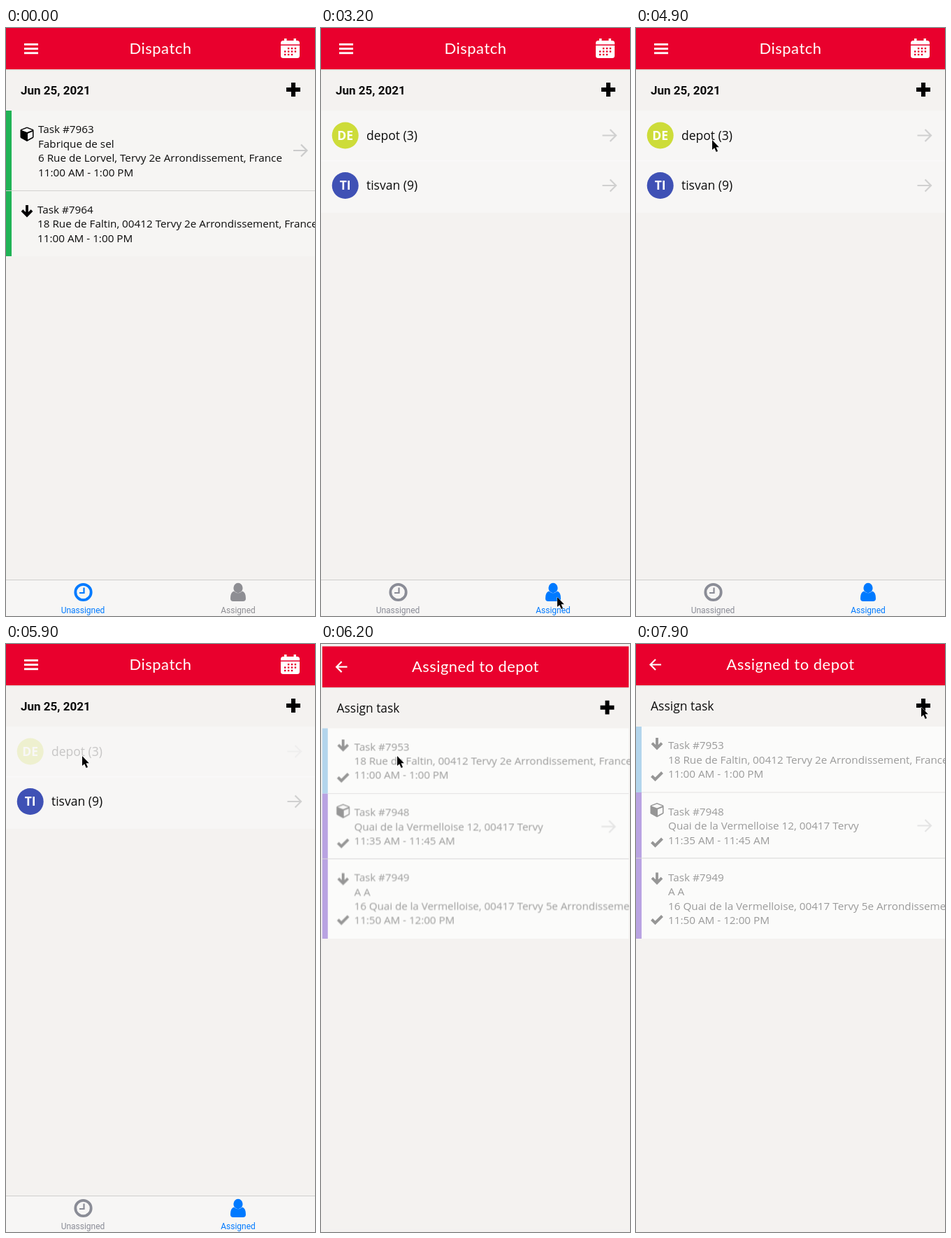
These frames come from a looping animation (442 px wide and 840 px high, 8 s). An HTML page:

```html
<!DOCTYPE html>
<html lang="en">
<head>
<meta charset="utf-8">
<title>Dispatch</title>
<style>
html, body { margin: 0; width: 100%; height: 100%; overflow: hidden; background: #f4f2f0; }
svg { display: block; width: 100vw; height: 100vh; }
text { font: 15.25px "Open Sans", "Noto Sans", sans-serif; fill: #0c0c0c; }
.title { font: 22px Lato, sans-serif; letter-spacing: .5px; fill: #fff; text-anchor: middle; }
.date { font: bold 17px Roboto, sans-serif; }
.big { font-size: 17.5px; }
.initials { font-size: 17.5px; font-weight: bold; fill: #fff; text-anchor: middle; }
.tab text { font: 12px Roboto, sans-serif; fill: currentColor; text-anchor: middle; }
.line { fill: none; stroke: currentColor; }
</style>
</head>
<body>
<svg id="stage" viewBox="0 0 442 840">
  <defs>
    <g id="cube">
      <path d="M0 -9.5 9 -6V5L0 10 -9 5V-6Z" stroke="#000" stroke-linejoin="round"/>
      <path d="M0 -8.4 7.8 -5.4 0 -2.5 -7.8 -5.4ZM1 -.8 8 -3.5V4.3L1 8.1Z" fill="#f8f7f6"/>
    </g>
    <path id="down" class="line" stroke-width="3.8" d="M0 -8.5V6M-7 -.8 0 6.2 7 -.8"/>
    <path id="check" class="line" stroke-width="4" d="M-7.5 0 -2.5 5 7.5 -5"/>
    <path id="next" class="line" stroke-width="2.2" d="M-10 0H9M1 -8.5 9.5 0 1 8.5"/>
    <path id="plus" class="line" stroke-width="6" stroke-linejoin="round" d="M401 88H421M411 78V98"/>
  </defs>
  <g id="home"></g>
  <g id="detail"></g>
  <path id="cursor" d="M0 0V14L3.2 11.2 5.7 17 8 16 5.5 10.3H9.8Z" stroke="#fff" stroke-width=".8" paint-order="stroke"/>
</svg>
<script>
const $ = id => document.getElementById(id);
const rect = (x, y, w, h, fill) => `<rect x="${x}" y="${y}" width="${w}" height="${h}" fill="${fill}"/>`;
const text = (x, y, s, cls = '') => `<text x="${x}" y="${y}" class="${cls}">${s}</text>`;
const icon = (name, x, y, color = '#000') => `<use href="#${name}" x="${x}" y="${y}" color="${color}"/>`;
const lines = (x, y, list) => list.map((s, i) => text(x, y + i * 20.5, s)).join('');

const header = title =>
  rect(0, 0, 442, 840, '#f4f2f0') + rect(0, 59, 442, 1.5, '#e2dcdc') +
  rect(0, 0, 442, 59, '#e9002d') + text(221, 37, title, 'title') + '<use href="#plus"/>';

function calendar() {
  let dots = '';
  for (let row = 0; row < 3; row++)
    for (let col = 0; col < 4; col++)
      if (row + col && row * col < 6) dots += rect(398 + col * 4.9, 28 + row * 4.4, 2.4, 2.4, '#e9002d');
  return '<rect x="393" y="18" width="27" height="25" rx="3.5" fill="#fff"/>' +
    rect(398, 15, 3.5, 5, '#fff') + rect(411.5, 15, 3.5, 5, '#fff') + rect(393, 23.5, 27, 1.5, '#e9002d') + dots;
}

const clock = `<circle cx="110.5" cy="806" r="11.2" class="line" stroke-width="3.8"/>
  <path d="M111.5 799.5V807H105" class="line" stroke-width="2.2"/>`;
const person = `<ellipse cx="332" cy="800" rx="6.6" ry="7.2" fill="currentColor"/>
  <path d="M326 804.5Q321 806 321 815 321 819 325 819H339Q343 819 343 815 343 806 338 804.5 332 810 326 804.5Z" fill="currentColor"/>`;

const userRow = (id, y, color, initials, label) => `<g id="${id}">
  <circle cx="34.7" cy="${y}" r="19" fill="${color}"/>` + text(34.7, y + 6.3, initials, 'initials') +
  text(65, y + 6, label, 'big') + icon('next', 412.5, y, '#d0d0d0') + '</g>';

const unassigned = rect(0, 118, 442, 208, '#f6f5f3') + rect(0, 118, 8, 208, '#21b356') +
  rect(0, 232, 442, 1, '#d3d1cf') + icon('cube', 30, 151.5) +
  lines(46, 150, ['Task #7963', 'Fabrique de sel', '6 Rue de Lorvel, Tervy 2e Arrondissement, France', '11:00 AM - 1:00 PM']) +
  icon('next', 421, 175, '#cbcbcb') + icon('down', 30, 261.5) +
  lines(45, 264.5, ['Task #7964', '18 Rue de Faltin, 00412 Tervy 2e Arrondissement, France', '11:00 AM - 1:00 PM']);

const assigned = rect(0, 118, 442, 146, '#f7f6f5') + rect(0, 189, 442, 1.5, '#faf9f9') +
  userRow('pressed', 153.5, '#cddc39', 'DE', 'depot (3)') +
  userRow('other', 225, '#3f51b5', 'TI', 'tisvan (9)');

$('home').innerHTML = header('Dispatch') +
  [22, 28.2, 34.4].map(y => rect(26, y, 20, 2.8, '#fff')).join('') + calendar() +
  text(21, 95, 'Jun 25, 2021', 'date') +
  `<g id="unassigned">${unassigned}</g><g id="assigned">${assigned}</g>` +
  rect(0, 788, 442, 52, '#f7f6f5') + rect(0, 788, 442, 1, '#cfcecd') +
  `<g id="tabLeft" class="tab">${clock}${text(110, 836.3, 'Unassigned')}</g>
   <g id="tabRight" class="tab">${person}${text(332, 836.3, 'Assigned')}</g>`;

const faded = content => `<g opacity=".4">${content}</g>`;
$('detail').innerHTML = header('Assigned to depot') +
  '<path d="M36 29.5H20.5M28 22 20.5 29.5 28 37" class="line" color="#fff" stroke-width="2.2"/>' +
  text(21, 95, 'Assign task', 'big') +
  rect(0, 118, 442, 303, '#fbfbfa') + rect(0, 118, 8, 94, '#b3d5ec') + rect(0, 212, 8, 209, '#b9a3e2') +
  rect(8, 211.5, 434, 1, '#e3e2e2') + rect(0, 305.5, 442, 1, '#d8d7d7') +
  faded(
    icon('down', 30, 142.5) + icon('check', 30, 188.5) +
    lines(46, 150, ['Task #7953', '18 Rue de Faltin, 00412 Tervy 2e Arrondissement, France', '11:00 AM - 1:00 PM']) +
    icon('cube', 30, 237) + icon('check', 30, 283) +
    lines(46, 244.5, ['Task #7948', 'Quai de la Vermelloise 12, 00417 Tervy', '11:35 AM - 11:45 AM']) +
    icon('next', 412.5, 259.5, '#c4c4c4') +
    icon('down', 30, 335) + icon('check', 30, 393.5) +
    lines(46, 338.5, ['Task #7949', 'A A', '16 Quai de la Vermelloise, 00417 Tervy 5e Arrondissement', '11:50 AM - 12:00 PM']));

const linear = u => u, easeIn = u => u * u, easeOut = u => u * (2 - u), smooth = u => u * u * (3 - 2 * u);
// time, x, y, easing towards this point
const path = [
  [800, 430, 496], [900, 384, 543, linear], [1100, 384, 543, linear], [1800, 216, 694, smooth],
  [2000, 291, 764, linear], [2400, 338, 813, easeOut], [3900, 338, 813, linear], [4800, 109, 160, smooth],
  [6700, 109, 160, linear], [7600, 213, 93, easeIn], [7900, 408, 90, easeOut], [8000, 408, 90, linear]
];

function cursorAt(t) {
  const i = Math.max(1, path.findIndex(p => p[0] > t));
  const [t0, x0, y0] = path[i - 1], [t1, x1, y1, ease] = path[i];
  const u = ease((t - t0) / (t1 - t0));
  return [x0 + (x1 - x0) * u, y0 + (y1 - y0) * u];
}

const show = (id, on) => $(id).style.display = on ? '' : 'none';
const clamp = (v, lo, hi) => Math.min(hi, Math.max(lo, v));
const zoom = s => `translate(221 420) scale(${s}) translate(-221 -420)`;

function draw(t) {
  const onAssigned = t >= 3200;
  show('unassigned', !onAssigned);
  show('assigned', onAssigned);
  $('tabLeft').style.color = onAssigned ? '#8a8c96' : '#007aff';
  $('tabRight').style.color = onAssigned ? '#007aff' : '#8e8e93';
  $('pressed').setAttribute('opacity', 1 - .8 * clamp((t - 5500) / 400, 0, 1));

  show('home', t < 6200);
  show('detail', t >= 6100);
  const age = t - 6100;
  $('home').setAttribute('transform', zoom(age < 0 ? 1 : 1.03));
  $('detail').setAttribute('transform', zoom(age < 400 ? 1 - .05 * Math.exp(-age / 55) : 1));
  $('detail').setAttribute('opacity', clamp(.6 + age / 250, 0, 1));

  show('cursor', t >= 800);
  if (t >= 800) $('cursor').setAttribute('transform', `translate(${cursorAt(t)})`);
}

const start = performance.now();
function tick(now) {
  draw(Math.floor(Math.max(0, now - start) % 8000 / 100) * 100);
  requestAnimationFrame(tick);
}
tick(start);
</script>
</body>
</html>
```
